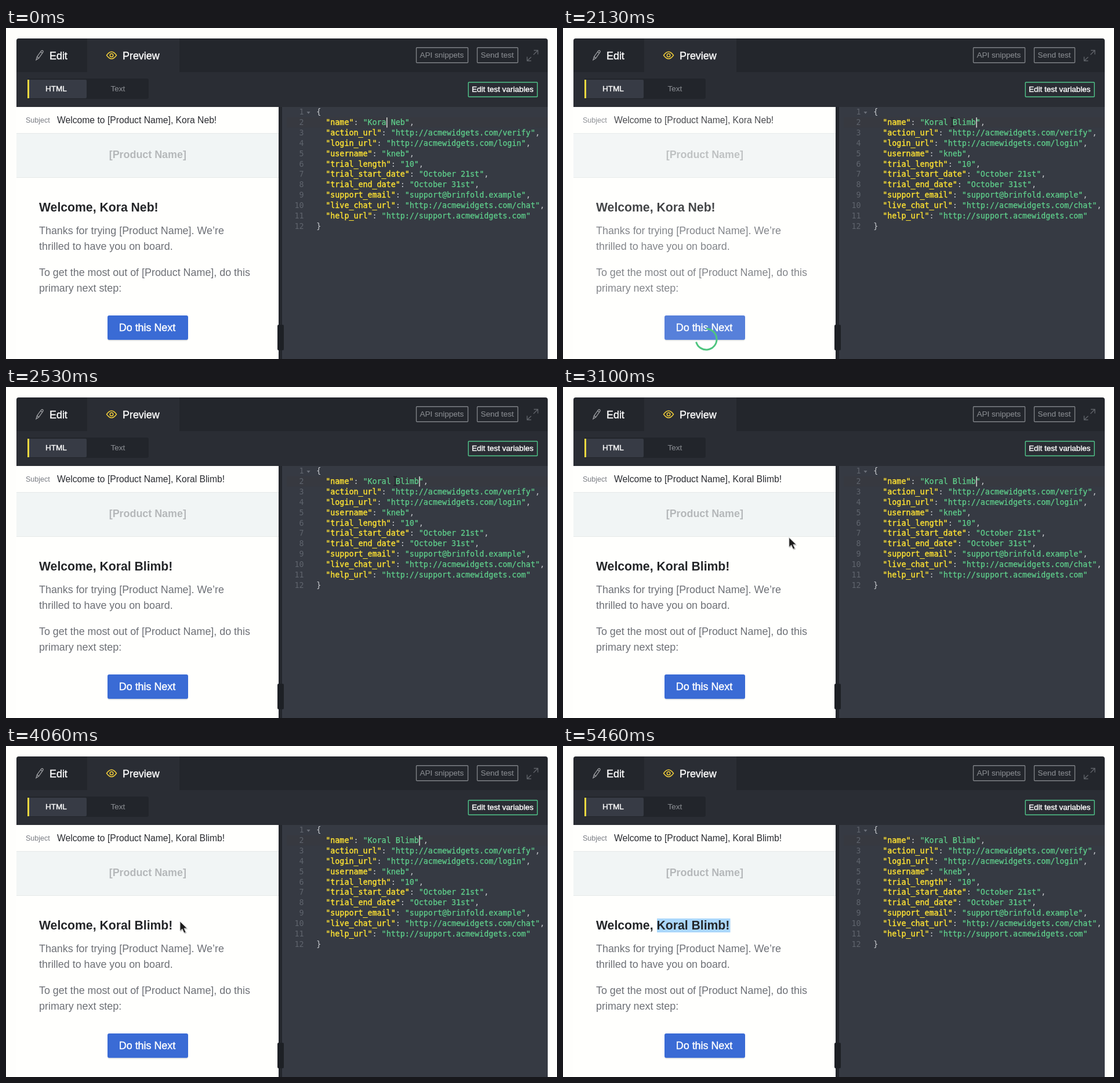
Animation, 950 px wide and 570 px high, one loop 5960 ms. Source, as an HTML page:

```html
<!DOCTYPE html>
<html lang="en">
<head>
<meta charset="utf-8">
<title>Template preview</title>
<style>
  html, body { margin: 0; width: 100%; height: 100%; overflow: hidden; background: #fefefc; }
  svg { display: block; width: 950px; height: 570px; font-family: "Liberation Sans", Arial, sans-serif; }
  text { white-space: pre; }
  .tab { font-size: 17.9px; fill: #fff; stroke: #fff; stroke-width: .4px; }
  .small { font-size: 13.5px; fill: #85888d; stroke: #85888d; stroke-width: .15px; }
  .bright { fill: #fff; stroke: #fff; stroke-width: .4px; }
  .body { font-size: 17.9px; fill: #6d7076; }
  .code { font: 13.34px "DejaVu Sans Mono", monospace; fill: #c9ccd0; }
  .num { fill: #5f646d; text-anchor: end; }
  .key { fill: #fee233; stroke: #fee233; stroke-width: .4px; }
  .str { fill: #5fd08c; stroke: #5fd08c; stroke-width: .25px; }
  .line { fill: none; stroke-width: 1.4; }
</style>
</head>
<body>
<svg viewBox="0 0 950 570">
  <!-- window and toolbars -->
  <path d="M18 570V22q0-4 4-4H930q4 0 4 4V570z" fill="#23262c"/>
  <path d="M140 18H299V76H934V136H18V76H140z" fill="#2a2d34"/>
  <path class="line" stroke="#96989c" stroke-width="1.2" d="M52 55l1.6-5.6L61 39.2q1.4-1 2.6 0 1 1 .2 2.4L56.6 52zM53.6 49.4l3 2.6M59.6 41l3 2.4"/>
  <text class="tab" x="75" y="53.5">Edit</text>
  <g class="line" stroke="#f3cf3b">
    <path d="M173.5 47q8.5-12 17 0-8.5 12-17 0z"/>
    <circle cx="182" cy="47" r="2.8"/>
  </g>
  <text class="tab" x="201" y="53.5">Preview</text>
  <g class="line" stroke="#7f8287">
    <rect x="707.5" y="33.7" width="89" height="26" rx="1"/>
    <rect x="812.5" y="33.7" width="70" height="26" rx="1"/>
  </g>
  <text class="small" x="713.5" y="51">API snippets</text>
  <text class="small" x="818.5" y="51">Send test</text>
  <path class="line" stroke="#5f6369" d="M910 38.5h7v7M917 38.5l-7.5 7.5M905.5 50l-7 6.5M898.5 49.5v7h7"/>

  <rect x="37" y="87" width="209" height="35" rx="3" fill="#22252b"/>
  <rect x="37" y="89" width="102" height="32" rx="2" fill="#373b45"/>
  <rect x="37" y="89" width="3" height="32" fill="#f7d93f"/>
  <text class="small bright" x="68" y="109">HTML</text>
  <text class="small" x="180.5" y="109">Text</text>
  <rect class="line" stroke="#51c78b" x="797.2" y="93.5" width="119" height="25" rx="1"/>
  <text class="small bright" x="803" y="110">Edit test variables</text>

  <!-- mail -->
  <rect x="18" y="136" width="452" height="434" fill="#fffffd"/>
  <g id="mail">
    <text x="34" y="163" font-size="12.5" fill="#777a80">Subject</text>
    <text id="subject" x="88" y="164" font-size="15.7" fill="#292b30"></text>
    <rect x="18" y="181" width="452" height="77" fill="#e5e9e9"/>
    <rect x="18" y="182" width="452" height="75" fill="#f1f5f5"/>
    <text x="244.3" y="224" font-size="17.9" font-weight="bold" fill="#b5b8ba" text-anchor="middle">[Product Name]</text>
    <rect id="mark" x="162" y="297" height="24" fill="#abd7fb"/>
    <text id="title" x="57" y="316" font-size="21.2" font-weight="bold" fill="#242629"></text>
    <text class="body" x="57" y="355">Thanks for trying [Product Name]. We’re</text>
    <text class="body" x="57" y="382">thrilled to have you on board.</text>
    <text class="body" x="57" y="427">To get the most out of [Product Name], do this</text>
    <text class="body" x="57" y="454">primary next step:</text>
    <rect x="175" y="497" width="139" height="42" rx="4" fill="#e2e4e5"/>
    <rect x="175" y="495" width="139" height="42" rx="3" fill="#3a6bd5"/>
    <text class="tab" x="194.8" y="522">Do this Next</text>
  </g>
  <path id="spin" fill="none" stroke="#4fc57f" stroke-width="3" d="M0-18A18 18 0 1 1-17.4 4.7"/>

  <!-- editor -->
  <rect x="476" y="136" width="458" height="434" fill="#363a43"/>
  <rect x="484" y="154" width="450" height="17.5" fill="#373940"/>
  <g id="code"></g>
  <path d="M518.5 144h6l-3 4z" fill="#6a6f78"/>
  <rect id="caret" y="154" width="1.5" height="17.5" fill="#dcdcda"/>
  <rect x="468" y="511" width="11" height="44" rx="2" fill="#1d2025"/>

  <!-- pointers -->
  <path id="beam" class="line" stroke="#202227" stroke-width="1.2" d="M-3-8q3 0 3 2V6q0 2-3 2M3-8q-3 0-3 2V6q0 2 3 2"/>
  <g id="arrow">
    <path d="M1 2v16l4-3.5 3 7 3.500-1.500-3-6.500h5z" fill="#000" opacity=".25"/>
    <path d="M0 0V16.500L3.900 13 7 20 10 18.700 7 12h5.300z" fill="#1c1c1c" stroke="#d8d8d8" stroke-width="1"/>
  </g>
</svg>
<script>
const LOOP = 5960, CHAR = 8.03, LEFT = 551.3, ROW = 17.83;
const OLD = "Kora Neb", NEW = "Koral Blimb";
const $ = id => document.getElementById(id);

const fields = [
  ["name", OLD],
  ["action_url", "http://acmewidgets.com/verify"],
  ["login_url", "http://acmewidgets.com/login"],
  ["username", "kneb"],
  ["trial_length", "10"],
  ["trial_start_date", "October 21st"],
  ["trial_end_date", "October 31st"],
  ["support_email", "support@brinfold.example"],
  ["live_chat_url", "http://acmewidgets.com/chat"],
  ["help_url", "http://support.acmewidgets.com"]
];

const put = (x, row, html, cls = "") =>
  `<text class="code ${cls}" x="${x}" y="${149.4 + row * ROW}">${html}</text>`;
const rows = fields.map(([key, value], i) => put(LEFT, i + 1,
  `<tspan class="key">"${key}"</tspan>: <tspan class="str">"<tspan${i ? "" : ' id="name"'}>${value}</tspan>"</tspan>` +
  (i < fields.length - 1 ? "," : "")));
const brace = LEFT - 2 * CHAR;
$("code").innerHTML = put(brace, 0, "{") + rows.join("") + put(brace, 11, "}") +
  Array.from({ length: 12 }, (_, i) => put(513.5, i, i + 1, "num")).join("");

// time, name in the editor, caret position inside it
const typing = [
  [0, OLD, 4], [60, "Koral Neb", 5], [560, "Koral Neb", 9], [900, "Koral ", 6],
  ...[0, 1, 2, 3, 4].map(i => [1400 + 75 * i, NEW.slice(0, 7 + i), 7 + i])
];
const blink = [[0, 1], [2660, 0], [3060, 1], [3560, 0], [4060, 1], [4560, 0]];
const fade = [[2000, 1], [2130, .85], [2265, .74], [2360, .74], [2530, 1]];
const ring = [[2000, 0], [2100, 1], [2400, 1], [2530, 0]];
const path = [
  [2660, 671, 162], [2760, 632, 176], [2900, 520, 216], [3100, 390, 259], [3230, 356, 288],
  [3420, 326, 301], [3800, 301, 303], [3900, 300, 302], [4330, 300, 302],
  [4480, 270, 360], [4640, 195, 424], [4780, 122, 432], [4915, 94, 407],
  [5040, 120, 350], [5140, 162, 309], [5200, 162, 309], [5440, 288, 309]
];

const step = (table, t) => table.findLast(k => k[0] <= t);

function track(table, t) {
  const i = table.findIndex(k => k[0] > t);
  if (i === 0) return table[0].slice(1);
  if (i < 0) return table.at(-1).slice(1);
  const a = table[i - 1], b = table[i], p = (t - a[0]) / (b[0] - a[0]);
  return a.slice(1).map((v, n) => v + (b[n + 1] - v) * p);
}

function place(id, x, y, on) {
  $(id).setAttribute("transform", `translate(${x} ${y})`);
  $(id).style.opacity = on ? 1 : 0;
}

function draw(t) {
  const [, name, at] = step(typing, t);
  $("name").textContent = name;
  $("caret").setAttribute("x", LEFT + (9 + at) * CHAR + .3);
  $("caret").style.opacity = step(blink, t)[1];

  const person = t < 2360 ? OLD : NEW;
  $("subject").textContent = `Welcome to [Product Name], ${person}!`;
  $("title").textContent = `Welcome, ${person}!`;
  $("mail").style.opacity = track(fade, t)[0];
  $("spin").style.opacity = track(ring, t)[0];
  $("spin").setAttribute("transform", `translate(247 536) rotate(${(t - 2130) * .45})`);

  const [x, y] = track(path, t);
  const picking = t >= 5100;
  const inCode = x > 474;
  place("arrow", x, y, t >= 2660 && !inCode && !picking);
  place("beam", x, y, (t >= 2000 && inCode) || (picking && t < 5460));
  $("mark").setAttribute("width", t < 5200 ? 0 : x - 162 + .5);
}

function tick() {
  draw(performance.now() % LOOP);
  requestAnimationFrame(tick);
}
tick();
</script>
</body>
</html>
```
